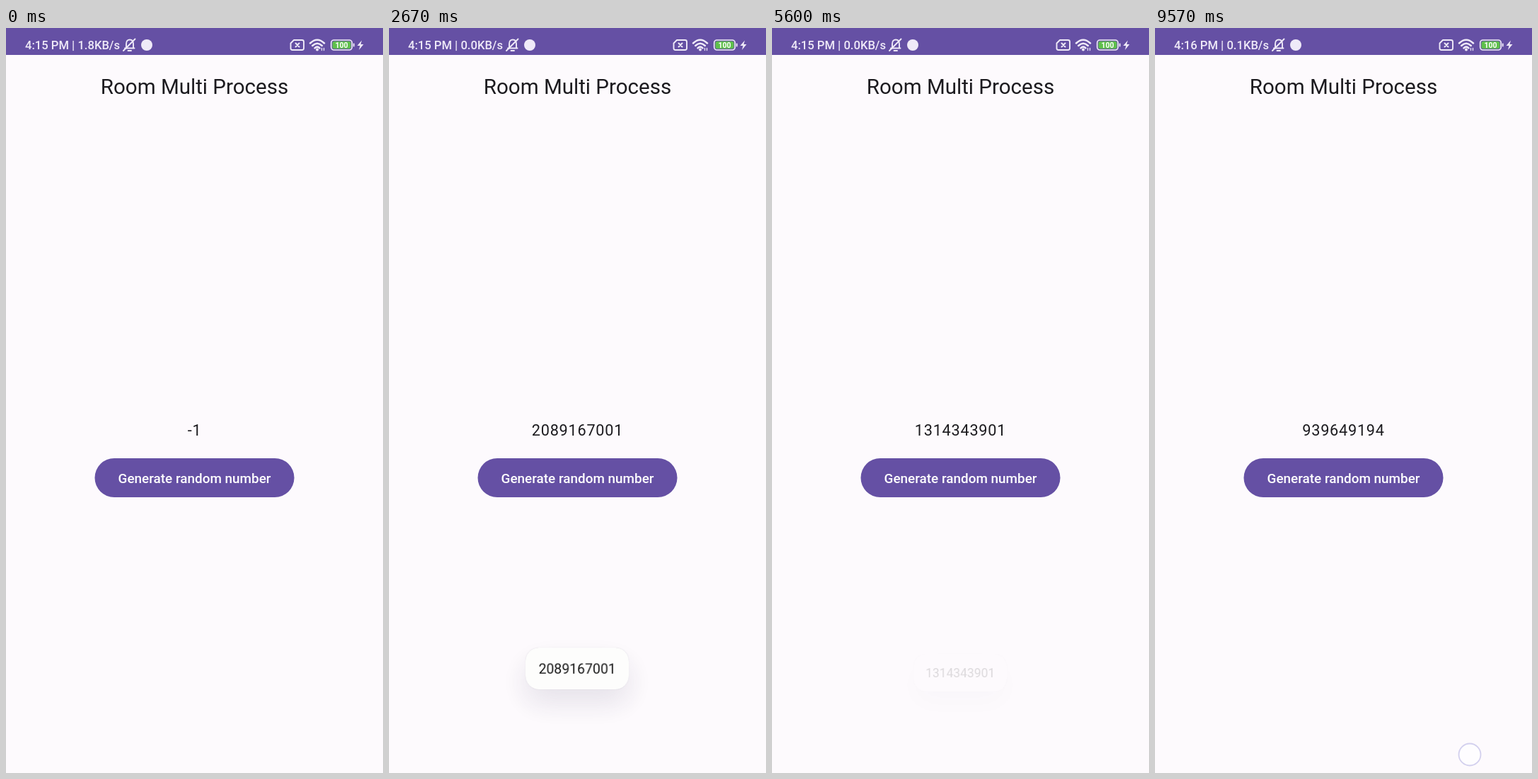
An HTML page for the animation above (9610 ms loop, 533x1051 px).

```html
<!DOCTYPE html>
<html lang="en">
<head>
<meta charset="utf-8">
<title>Room Multi Process</title>
<style>
  :root { --loop: 9610ms; --icon: #efeaf8; }
  html, body { margin: 0; width: 100%; height: 100%; overflow: hidden; background: #fdfafd; }
  body { position: relative; font-family: Roboto, sans-serif; }
  svg { position: absolute; left: 0; top: 0; display: block; }
  .mid { text-anchor: middle; }
  .title { font-size: 29.55px; fill: #1c1b1f; }
  .num { font-size: 21.7px; letter-spacing: .75px; fill: #1c1b1f; }
  .label { font-size: 18.9px; font-weight: 500; fill: #fff; }
  .status { font-size: 16.6px; font-weight: 500; fill: var(--icon); }
  .purple { fill: #6550a4; }
  .solid { fill: var(--icon); }
  .line { fill: none; stroke: var(--icon); stroke-width: 1.9; stroke-linecap: round; stroke-linejoin: round; }

  /* hard switches */
  .step { opacity: 0; animation: var(--k) var(--loop) step-end infinite both; }
  @keyframes n0 { 0% { opacity: 1 } 6.24% { opacity: 0 } }
  @keyframes n1 { 0% { opacity: 0 } 6.24% { opacity: 1 } 35.9% { opacity: 0 } }
  @keyframes n2 { 0% { opacity: 0 } 35.9% { opacity: 1 } 66.9% { opacity: 0 } }
  @keyframes n3 { 0% { opacity: 0 } 66.9% { opacity: 1 } 100% { opacity: 1 } }
  @keyframes s0 { 0% { opacity: 1 } 20.81% { opacity: 0 } }
  @keyframes s1 { 0% { opacity: 0 } 20.81% { opacity: 1 } 62.43% { opacity: 0 } }
  @keyframes s2 { 0% { opacity: 0 } 62.43% { opacity: 1 } 100% { opacity: 1 } }
  @keyframes m0 { 0% { opacity: 1 } 93.4% { opacity: 0 } }
  @keyframes m1 { 0% { opacity: 0 } 93.4% { opacity: 1 } 100% { opacity: 1 } }
  @keyframes touch { 0% { opacity: 0 } 98.3% { opacity: 1 } 100% { opacity: 1 } }

  .ripple {
    fill: #fff; opacity: 0; transform-origin: 266.5px 634.5px;
    animation: ripple var(--loop) var(--at) linear infinite both;
  }
  @keyframes ripple {
    0% { opacity: 0; transform: scale(.3) }
    .78% { opacity: .1 }
    2.4% { transform: scale(1) }
    3% { opacity: .1 }
    4.7%, 100% { opacity: 0; transform: scale(1) }
  }

  .toast {
    position: absolute; left: 0; right: 0; top: 867px;
    width: max-content; margin: auto; padding: 2px 19.4px 0;
    font-size: 20.2px; line-height: 59px; color: #111;
    background: #fdfdfc; border-radius: 20px;
    box-shadow: 0 0 1px rgba(60, 50, 90, .25), 0 20px 42px rgba(70, 60, 100, .13);
    opacity: 0;
    animation: move var(--loop) var(--at) linear infinite both,
               fade var(--loop) var(--at) linear infinite both;
  }
  @keyframes move {
    0% { transform: translateY(25px) scale(.85); animation-timing-function: cubic-bezier(.22, 1, .36, 1) }
    5.2%, 21.02% { transform: none }
    21.364% { transform: translateY(6px) scale(.964) }
    22.27% { transform: translateY(12px) scale(.866) }
    23.83%, 100% { transform: translateY(13px) scale(.83) }
  }
  @keyframes fade {
    0% { opacity: 0 }
    1.5%, 21.02% { opacity: 1 }
    21.364% { opacity: .98 }
    22.27% { opacity: .14 }
    23.83%, 100% { opacity: 0 }
  }
</style>
</head>
<body>
<svg width="533" height="1051" viewBox="0 0 533 1051">
  <defs><clipPath id="pill"><rect x="125.5" y="607" width="282" height="55" rx="27.5"/></clipPath></defs>

  <rect class="purple" width="533" height="38"/>
  <g class="status">
    <text class="step" style="--k:m0" x="27" y="30">4:15 PM |</text>
    <text class="step" style="--k:m1" x="27" y="30">4:16 PM |</text>
    <g text-anchor="end">
      <text class="step" style="--k:s0" x="161" y="30">1.8KB/s</text>
      <text class="step" style="--k:s1" x="161" y="30">0.0KB/s</text>
      <text class="step" style="--k:s2" x="161" y="30">0.1KB/s</text>
    </g>
  </g>

  <!-- muted bell, app dot -->
  <g class="line">
    <path d="M168 28.5H181.500M170 28V22.500C170 18.500 172 16.500 175 16.500S180 18.500 180 22.500V28M172.500 32H177"/>
    <path d="M182.500 15.500L166 32"/>
  </g>
  <circle class="solid" cx="199" cy="24" r="8"/>

  <!-- no SIM, wifi, battery, charging -->
  <g class="line">
    <path d="M407 17H418.500Q421 17 421 19.500V28.500Q421 31 418.500 31H405Q402.500 31 402.500 28.500V21.500Z"/>
    <path d="M409.500 21.500L414.500 26.500M414.500 21.500L409.500 26.500"/>
    <path d="M430 21.500Q440 12 450 21.500M433.200 25Q440 18.500 446.800 25M436.500 28.300Q440 25 443.500 28.300" stroke-width="2.500"/>
    <path d="M446.500 31.500V28.500M449.500 28.500V31.500" stroke-width="1.300"/>
    <rect x="459.700" y="17" width="29.500" height="14" rx="4" stroke-width="1.700"/>
    <path d="M491.700 22.500V25.500"/>
  </g>
  <circle class="solid" cx="440" cy="30.500" r="2"/>
  <rect x="461.500" y="18.800" width="26" height="10.400" rx="2.500" fill="#5fc04c"/>
  <text class="mid" x="474.500" y="27.900" font-size="10.500" font-weight="700" fill="#fff">100</text>
  <path class="solid" d="M503 17.500L496.500 25H500.500L499 31L505.500 23H501.500Z"/>

  <text class="mid title" x="266.500" y="93">Room Multi Process</text>

  <g class="mid num">
    <text class="step" style="--k:n0" x="266.500" y="574.600">-1</text>
    <text class="step" style="--k:n1" x="266.500" y="574.600">2089167001</text>
    <text class="step" style="--k:n2" x="266.500" y="574.600">1314343901</text>
    <text class="step" style="--k:n3" x="266.500" y="574.600">939649194</text>
  </g>

  <g clip-path="url(#pill)">
    <rect class="purple" x="125" y="607" width="283" height="55"/>
    <circle class="ripple" style="--at:500ms" cx="266.500" cy="634.500" r="145"/>
    <circle class="ripple" style="--at:3370ms" cx="266.500" cy="634.500" r="145"/>
    <circle class="ripple" style="--at:6330ms" cx="266.500" cy="634.500" r="145"/>
  </g>
  <text class="mid label" x="266.500" y="642">Generate random number</text>

  <circle class="step" style="--k:touch" cx="445" cy="1025" r="15.500" fill="#fefdff" stroke="#d3d0ee" stroke-width="1.800"/>
</svg>

<div class="toast" style="--at:617ms">2089167001</div>
<div class="toast" style="--at:3460ms">1314343901</div>
<div class="toast" style="--at:6430ms">939649194</div>
</body>
</html>
```
